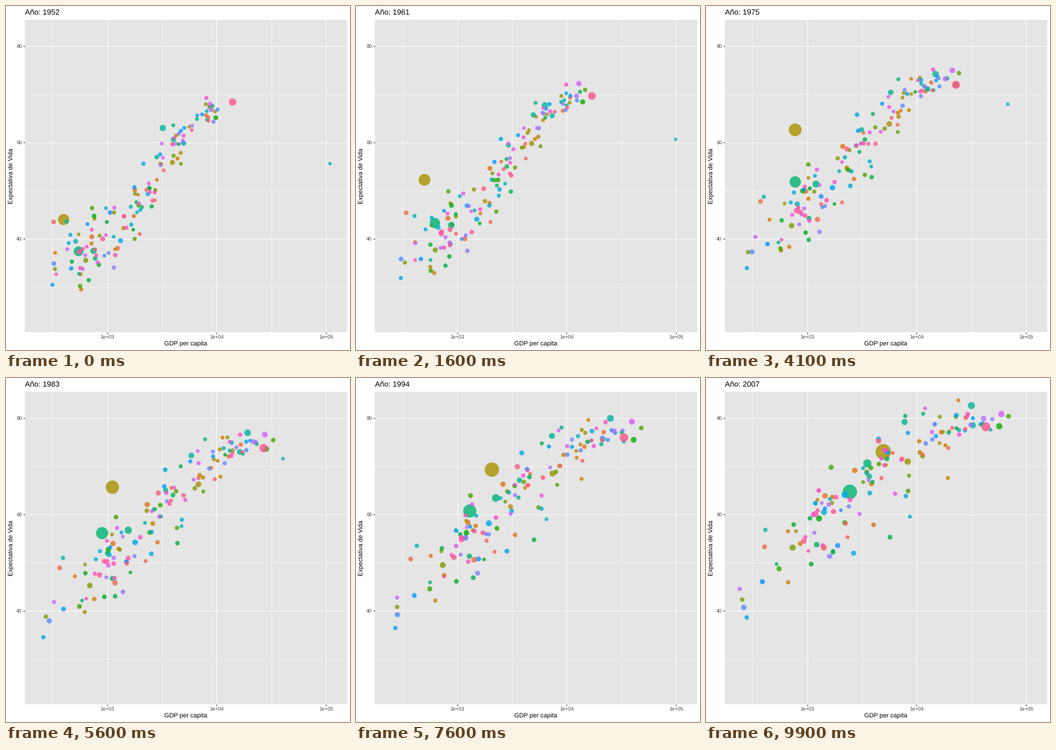
Animation of 600 by 600 pixels, one loop 10 s. Source, as a matplotlib script:

```python
import numpy as np
import matplotlib.pyplot as plt
from matplotlib.animation import FuncAnimation

plt.rcParams["font.family"] = "Liberation Sans"
plt.rcParams["text.hinting"] = "none"
SIZE, DPI = 600, 72
DOTS, KNOTS, STEPS = 142, 12, 9
FRAMES = (KNOTS - 1) * STEPS + 1
T = np.linspace(0, 1, KNOTS)
rng = np.random.default_rng(1952)

# Bubbles that stand out: hue index, population (millions) at start and end,
# then (income, life expectancy) at four evenly spaced times.
LEADERS = [
    (24, 556, 1319, (400, 44), (640, 61), (1420, 67.7), (4959, 73)),
    (58, 372, 1110, (547, 37.4), (720, 49.5), (990, 59), (2452, 64.7)),
    (134, 157, 301, (13990, 68.4), (21000, 71), (29900, 75), (42952, 78.2)),
    (66, 86, 127, (3217, 63), (13000, 72.7), (22700, 78.8), (31656, 82.6)),
    (59, 82, 223, (750, 37.5), (1050, 48.5), (1850, 60.3), (3541, 70.6)),
    (71, 0.2, 2.5, (108382, 55.6), (90000, 66), (28500, 74), (47307, 77.6)),
]


def radius(millions):
    share = np.clip((millions - 0.06) / 1318.6, 0, 1)
    return 0.375 * (2.845 * (2 + 10 * np.sqrt(share)) + 0.94) + 0.35


def life_at(g):
    """S-curve of life expectancy over log income, rising with time."""
    floor, span = 35 + 10 * T, 36 - T
    middle, width = 3.45 - 0.15 * T, 0.25 + 0.1 * T
    return floor + span / (1 + np.exp((middle - g) / width))


def hue_color(i):
    """Evenly spaced hue of constant chroma and luminance."""
    h = np.radians(15 + 360 * i / DOTS)
    L, C = 65, 100
    Y = ((L + 16) / 116) ** 3
    u = C * np.cos(h) / (13 * L) + 0.19784
    v = C * np.sin(h) / (13 * L) + 0.46834
    X = 9 * Y * u / (4 * v)
    Z = -X / 3 - 5 * Y + 3 * Y / v
    rgb = np.array([3.2405 * X - 1.5371 * Y - 0.4985 * Z,
                    -0.9693 * X + 1.8760 * Y + 0.0416 * Z,
                    0.0556 * X - 0.2040 * Y + 1.0572 * Z])
    rgb = np.clip(rgb, 0, 1)
    rgb = np.where(rgb > 0.00304, 1.055 * rgb ** (1 / 2.4) - 0.055, 12.92 * rgb)
    return np.clip(rgb, 0, 1) ** 1.22


def normal(*shape):
    return np.clip(rng.normal(size=shape), -2, 2)


# Every dot has a wealth rank; richer dots grow faster and scatter less.
rank = rng.permutation((np.arange(DOTS) + 0.5) / DOTS)[:, None]
start = 2.55 + 1.45 * rank + 0.08 * normal(DOTS, 1)
growth = 0.08 + 0.55 * rank + 0.2 * normal(DOTS, 1)
income = start + growth * T ** 0.85 + 0.02 * normal(DOTS, KNOTS)

scatter = (4.5 + T) * (1 - 0.8 * rank ** 2)
drift = normal(DOTS, 1) * (1 - 0.3 * T) + 0.6 * normal(DOTS, 1) * T
lagging = (rng.random((DOTS, 1)) < 0.16) & (rank > 0.3) & (rank < 0.75)
life = (life_at(income) + scatter * drift - 12 * lagging * T
        + 0.3 * normal(DOTS, KNOTS))
rad = radius(6 * np.exp(normal(DOTS, 1)) * rng.uniform(1.5, 3.2, (DOTS, 1)) ** T)

for i, p0, p1, *path in LEADERS:
    money, years = np.transpose(path)
    keys = np.linspace(0, 1, len(path))
    income[i] = np.interp(T, keys, np.log10(money))
    life[i] = np.interp(T, keys, years)
    rad[i] = radius(p0 * (p1 / p0) ** T)

fig = plt.figure(figsize=(SIZE / DPI, SIZE / DPI), dpi=DPI, facecolor="white")
LEFT, RIGHT, TOP, BOTTOM = 33, 594.5, 23.5, 568.5
DECADE, YEAR = 190.9, 8.4
ax = fig.add_axes([LEFT / SIZE, 1 - BOTTOM / SIZE,
                   (RIGHT - LEFT) / SIZE, (BOTTOM - TOP) / SIZE],
                  facecolor="#e5e5e5")
ax.set_xlim(3 + (LEFT - 176.5) / DECADE, 3 + (RIGHT - 176.5) / DECADE)
ax.set_ylim(80 - (BOTTOM - 70) / YEAR, 80 - (TOP - 70) / YEAR)
ax.spines[:].set_visible(False)
ax.set_axisbelow(True)
ax.set_xticks([3, 4, 5])
ax.set_yticks([40, 60, 80])
ax.set_xticks([2.5, 3.5, 4.5], minor=True)
ax.set_yticks([30, 50, 70], minor=True)
ax.tick_params(length=2.75, width=1.07, color="#2b2b2b",
               labelbottom=False, labelleft=False)
ax.tick_params(which="minor", length=0)
ax.grid(which="major", color="white", lw=1.07)
ax.grid(which="minor", color="white", lw=0.53)


def label(x, y, text, size, color="black", **kw):
    return fig.text(x / SIZE, 1 - y / SIZE, text, fontsize=size, color=color,
                    va="baseline", **kw)


for k in (3, 4, 5):
    label(176.5 + DECADE * (k - 3), 580, f"1e+0{k}", 8.8, "#444444", ha="center")
for years in (40, 60, 80):
    label(28, 73 + YEAR * (80 - years), str(years), 8.8, "#444444", ha="right")
label((LEFT + RIGHT) / 2, 593, "GDP per capita", 11, ha="center")
label(13, (TOP + BOTTOM) / 2, "Expectativa de Vida", 11, ha="center",
      rotation=90, rotation_mode="anchor")
title = label(LEFT, 15, "", 13.2, ha="left")

dots = ax.scatter(income[:, 0], life[:, 0], s=(2 * rad[:, 0]) ** 2,
                  c=[hue_color(i) for i in range(DOTS)],
                  alpha=0.8, linewidths=0, zorder=3)


def update(frame):
    k = min(frame // STEPS, KNOTS - 2)
    f = frame / STEPS - k
    x, y, r = (a[:, k] + (a[:, k + 1] - a[:, k]) * f
               for a in (income, life, rad))
    dots.set_offsets(np.column_stack([x, y]))
    dots.set_sizes((2 * r) ** 2)
    title.set_text(f"Año: {round(1952 + 5 * frame / STEPS)}")
    return dots, title


anim = FuncAnimation(fig, update, frames=FRAMES, interval=100,
                     repeat=True, repeat_delay=0, blit=False)
plt.show()
```
